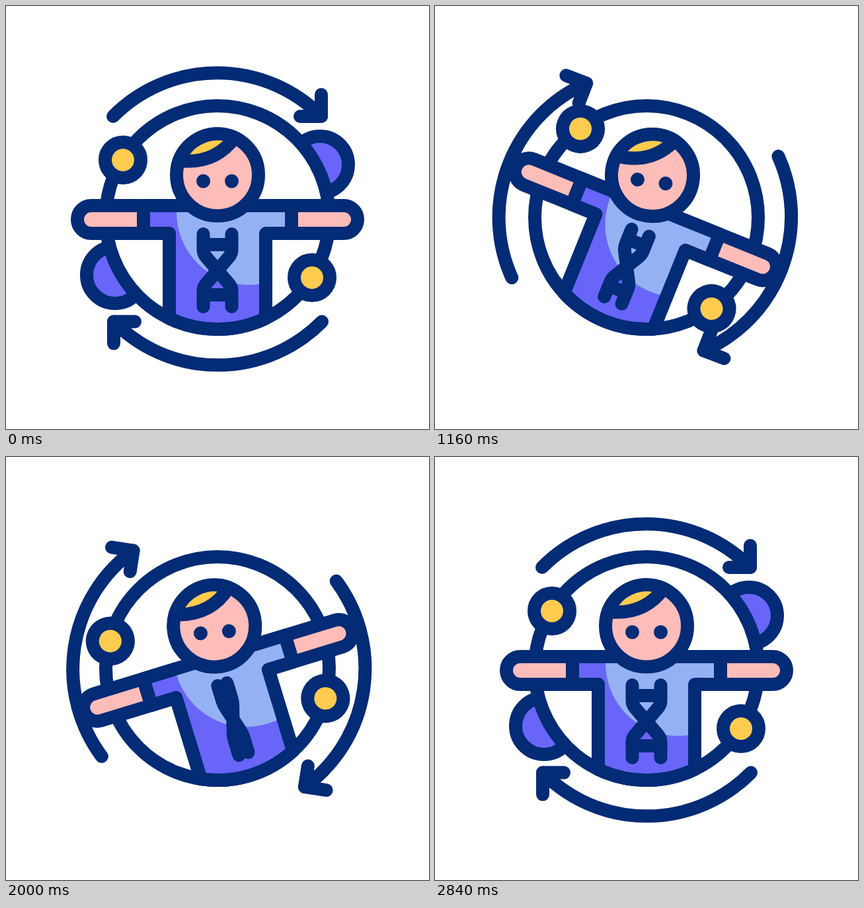
These frames come from a looping animation (640 by 640 pixels, 3000 ms). An HTML page:

```html
<!DOCTYPE html>
<html lang="en">
<head>
<meta charset="utf-8">
<style>
  html, body { margin: 0; height: 100%; overflow: hidden; background: #fff; }
  svg { display: block; width: 100%; height: 100%; }
  .line { fill: none; stroke: #032b76; stroke-width: 20; stroke-linecap: round; stroke-linejoin: round; }
  .white { fill: #fff; }
  .skin { fill: #ffbdb9; }
  .gold { fill: #ffcc4f; }
  .violet { fill: #6865f8; }
  .sky { fill: #94b2f3; }
  .navy { fill: #032b76; }
</style>
</head>
<body>
<svg viewBox="0 0 640 640">
  <defs>
    <path id="shirt" d="M208 302H432V344H393V472.5A169 169 0 0 1 247 472.5V344H208Z"/>
    <clipPath id="shirtClip"><use href="#shirt"/></clipPath>
    <g id="arrow">
      <path d="M162 167A221.5 221.5 0 0 1 477 167"/>
      <path d="M477 134V167H445"/>
    </g>
  </defs>

  <g id="arrows" class="line">
    <use href="#arrow"/>
    <use href="#arrow" transform="rotate(180 320 322.3)"/>
  </g>

  <g id="blobs" class="line">
    <circle class="violet" cx="475" cy="240" r="43"/>
    <circle class="violet" cx="165" cy="407" r="43"/>
  </g>

  <circle class="line white" cx="320" cy="320" r="169"/>

  <g id="body">
    <g class="line">
      <path class="skin" d="M208 302H129a21 21 0 0 0 0 42H208Z"/>
      <path class="skin" d="M432 302H511a21 21 0 0 1 0 42H432Z"/>
      <use href="#shirt" class="violet"/>
    </g>
    <circle class="sky" cx="368" cy="312" r="110" clip-path="url(#shirtClip)"/>
    <use href="#shirt" class="line"/>
    <path id="dna" class="line"/>
    <g class="line">
      <circle class="gold" cx="177" cy="233" r="27"/>
      <circle class="gold" cx="463" cy="411" r="27"/>
    </g>
    <g id="head">
      <circle class="line skin" cx="320" cy="255.5" r="62"/>
      <path class="line gold" d="M262 234Q316 240 346 199A62 62 0 0 0 262 234Z"/>
      <circle class="navy" cx="298.5" cy="265" r="10.5"/>
      <circle class="navy" cx="341.5" cy="265" r="10.5"/>
    </g>
  </g>
</svg>
<script>
const LOOP = 3000, STEP = 40;
const $ = id => document.getElementById(id);
const [arrows, blobs, body, head, dna] = ['arrows', 'blobs', 'body', 'head', 'dna'].map($);
const blobDots = [...blobs.children];

// Keys are [time, value]; motion eases in and out between them.
const tracks = {
  spin: [[200, 0], [2800, 360]],
  tilt: [[200, 0], [1000, 22], [1200, 22], [2000, -17], [2200, -17], [2800, 0]],
  nod: [[200, 0], [800, -14], [1660, -14], [2050, 14], [2200, 14], [2530, 0]],
  tuck: [[200, 0], [1000, 71], [2200, 71], [2800, 0]],
  twist: [[200, 1], [1500, -1], [2800, 1]]
};

function valueAt(keys, t) {
  const next = keys.findIndex(key => key[0] > t);
  if (next === 0) return keys[0][1];
  if (next < 0) return keys[keys.length - 1][1];
  const [t0, v0] = keys[next - 1], [t1, v1] = keys[next];
  const s = (t - t0) / (t1 - t0);
  return v0 + (v1 - v0) * s * s * (3 - 2 * s);
}

const rotate = (el, angle) => el.setAttribute('transform', `rotate(${angle} 320 320)`);

function dnaPath(twist) {
  const x = offset => 320 + offset * twist;
  const strand = side => {
    const out = 21.5 * side, bend = 17 * side;
    return `M${x(-out)} 345V369Q${x(-out)} 375 ${x(-bend)} 380L${x(bend)} 420Q${x(out)} 425 ${x(out)} 431V455`;
  };
  const rung = y => `M${x(-21.5)} ${y}H${x(21.5)}`;
  return strand(1) + strand(-1) + rung(361) + rung(437);
}

function draw(t) {
  const at = name => valueAt(tracks[name], t);
  rotate(arrows, at('spin'));
  rotate(blobs, at('tilt'));
  rotate(body, at('tilt'));
  rotate(head, at('nod'));
  const tuck = at('tuck');
  blobDots.forEach((dot, i) => {
    const side = i ? -1 : 1;
    dot.setAttribute('transform', `translate(${-0.88 * tuck * side} ${0.475 * tuck * side})`);
  });
  dna.setAttribute('d', dnaPath(at('twist')));
}

const start = performance.now();
function tick() {
  const t = (performance.now() - start) % LOOP;
  draw(Math.floor(t / STEP) * STEP);
  requestAnimationFrame(tick);
}
tick();
</script>
</body>
</html>
```
